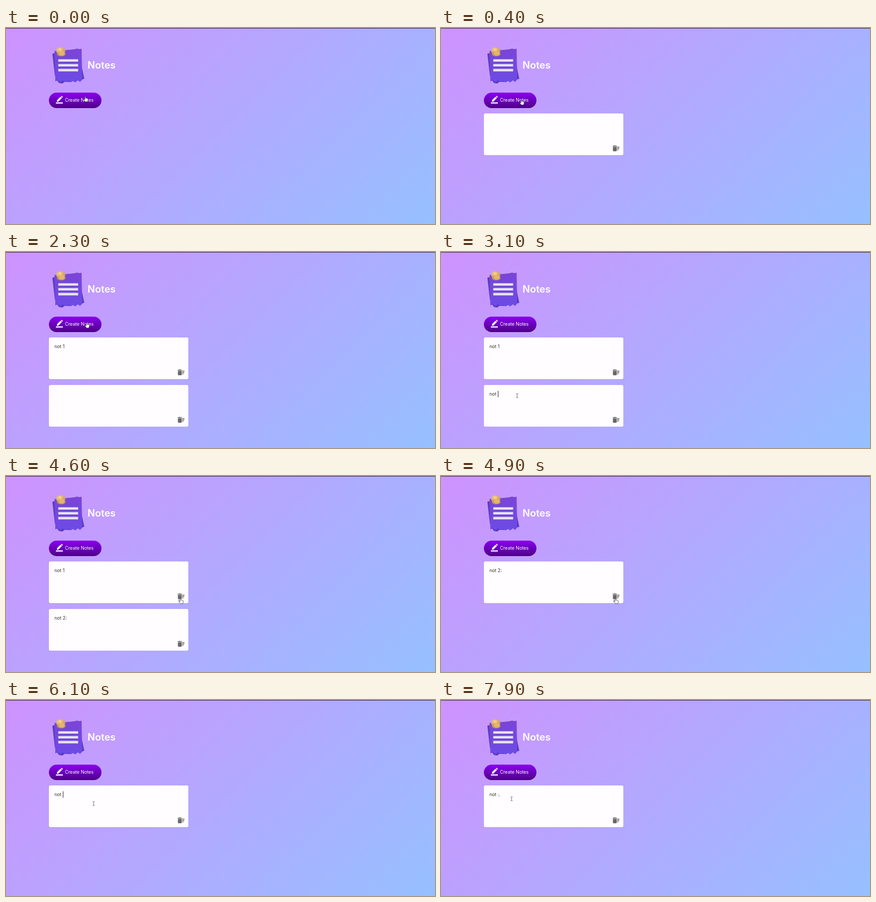
An HTML page that plays this animation: 800 px wide and 367 px high, repeating every 8000 ms.

```html
<!DOCTYPE html>
<html lang="en">
<head>
<meta charset="utf-8">
<title>Notes</title>
<style>
  html, body { margin: 0; width: 100%; height: 100%; overflow: hidden; }
  #stage {
    position: relative; width: 800px; height: 367px; overflow: hidden;
    background: linear-gradient(135deg, #ce92fe, #96c0ff);
    font-family: Inter, "Open Sans", sans-serif; font-size: 8.6px; line-height: 12px;
  }
  #stage > * { position: absolute; }
  #bar { left: 0; top: 0; width: 800px; height: 1.2px; background: #39363b; }
  h1 { left: 152px; top: 57px; margin: 0; color: #fff; font-size: 18.4px; font-weight: 600; line-height: 25px; }
  #create {
    left: 80px; top: 121px; width: 98px; height: 29px; border-radius: 15px;
    background: linear-gradient(#8a00f2, #4e0086); color: #fff;
  }
  #create span { position: absolute; left: 30px; top: 8px; white-space: pre; }
  .note { left: 80px; width: 260px; height: 78px; border-radius: 3px; background: #fffdff; color: #333; }
  .note span { position: absolute; left: 10.2px; top: 11px; white-space: pre; }
  .note i { position: absolute; left: 100%; top: 0; width: .7px; height: 11.5px; background: #333; }
  .note svg { position: absolute; left: 239px; top: 59px; }
  #art { left: 0; top: 0; }
</style>
</head>
<body>
<div id="stage">
  <div id="bar"></div>
  <h1>Notes</h1>
  <div id="create"><span>Create Notes</span></div>
  <div class="note" style="top:160px"></div>
  <div class="note" style="top:249px"></div>
  <svg id="art" width="800" height="367">
    <defs>
      <linearGradient id="paper" x2="0" y2="1"><stop stop-color="#7a45d6"/><stop offset="1" stop-color="#6c4be6"/></linearGradient>
      <radialGradient id="gold" cx=".4" cy=".3"><stop stop-color="#f6d79a"/><stop offset="1" stop-color="#d3a05a"/></radialGradient>
    </defs>
    <path fill="#5a3cc4" d="M86.500 48 134 38.500 146 95 140 97 135 96 120 101 109 101 105 104 99 103 95 98 91 88Z"/>
    <path fill="url(#paper)" d="M90.500 43 141 39 142 97 138 101 134 98 129 102 125 99 120 102 116 99 111 101 106 98 101 101 97 98 92 100Z"/>
    <path stroke="#e7e2f4" stroke-width="4.600" d="M97.500 60.700h37M97.500 69.800h37M97.500 78.900h37"/>
    <ellipse cx="103" cy="48.500" rx="8" ry="4.500" fill="#c9964f"/>
    <ellipse cx="102" cy="42.800" rx="8.800" ry="6.600" fill="url(#gold)"/>
    <ellipse cx="104" cy="47.500" rx="5.500" ry="4" fill="#e2b570"/>
    <path fill="#fff" d="M95 138v-2.700l6.600-6.600 2.600 2.600-6.700 6.700ZM102.300 128l.9-.8q.5-.4 1 0l1.500 1.600q.4.500 0 1l-.8.800ZM93 139.300h13v2.200H93Z"/>
    <g id="pointers" stroke-linejoin="round">
      <path id="hand" fill="#fff" stroke="#333" stroke-width=".7" d="M-.8 6V.8Q0-.4.8.8V3.500Q1.700 3 2.300 3.800 3.200 3.300 3.700 4.200 4.900 3.900 5 5V7Q4.500 8.500 4 10H-.3L-2.900 6.600Q-3-.0 -2.900 6.200-2.200 5-.8 6Z"/>
      <path id="arrow" fill="#fff" stroke="#333" stroke-width=".7" d="M0 0V7L1.700 5.500 2.800 8 4 7.400 2.900 5H5Z"/>
      <path id="beam" fill="none" stroke="#555" stroke-width=".8" d="M-2-3.600H-.6L0-3.100.6-3.600H2M0-3.100V3.100M-2 3.600H-.6L0 3.100.6 3.600H2"/>
    </g>
  </svg>
</div>
<script>
const LOOP = 8000, TICK = 100;

// Start time, then the text of each note; a trailing "|" marks the focused one.
const edits = [
  [0],
  [400, ""], [600, "|"], [800, "n|"], [900, "no|"], [1000, "not|"], [1100, "not |"], [1300, "not 1|"],
  [2200, "not 1"], [2300, "not 1", ""], [2800, "not 1", "|"],
  [2900, "not 1", "n|"], [3000, "not 1", "no|"], [3100, "not 1", "not |"],
  [3300, "not 1", "not 2|"], [3600, "not 1", "not 2:|"], [4400, "not 1", "not 2:"],
  [4800, "not 2:"], [5000],
  [5600, ""], [5800, "|"], [5900, "n|"], [6000, "no|"], [6100, "not |"],
  [6500, "not :|"], [7300, "not :.|"]
];

// Time, x, y and the pointer shape used from then on.
const moves = [
  [0, 148, 128, "hand"], [400, 150, 134, "hand"], [500, 156, 164, "beam"], [600, 162, 188, "beam"],
  [1600, 162, 188, "beam"], [1900, 156, 156, "arrow"], [2000, 151, 134, "hand"], [2500, 150, 131, "hand"],
  [2600, 149, 150, "arrow"], [2700, 145, 215, "beam"], [2800, 142, 269, "beam"],
  [3700, 142, 269, "beam"], [4000, 225, 243, "arrow"], [4200, 305, 230, "beam"], [4400, 325.5, 229, "hand"],
  [5000, 325.5, 229, "hand"], [5100, 285, 206, "arrow"], [5300, 169.5, 147, "arrow"],
  [5400, 151, 134, "hand"], [5600, 151, 134, "hand"], [5700, 158, 170, "beam"], [5800, 163.5, 194, "beam"],
  [6200, 163.5, 194, "beam"], [7000, 140, 185, "beam"], [7900, 131.7, 185, "beam"]
];

const noteBoxes = [...document.querySelectorAll(".note")];
const pointers = document.getElementById("pointers");
const trash = `<svg width="16" height="14" fill="#666">
  <path d="M1 1.400h2.500l.5-.7h2.200l.5.700h2.500v1.400H1ZM1.600 3.500h7V10.500q0 1.200-1.200 1.200H2.800Q1.600 11.700 1.600 10.500Z"/>
  <path d="M9.300 3.500h4.600v1.400H9.300ZM9.300 6.100h3.900v1.400H9.300ZM9.300 8.700h2.500v1.400H9.300Z"/></svg>`;

const indexAt = (steps, t) => steps.findLastIndex(step => step[0] <= t);

function noteContent(text, caretOn) {
  const caret = text.endsWith("|") && caretOn ? "<i></i>" : "";
  return `<span>${text.replace("|", "")}${caret}</span>${trash}`;
}

function drawNotes(t) {
  const [start, ...texts] = edits[indexAt(edits, t)];
  const caretOn = (t - start) % 1000 < 500;
  noteBoxes.forEach((box, i) => {
    const shown = i < texts.length;
    box.style.display = shown ? "" : "none";
    if (shown) box.innerHTML = noteContent(texts[i], caretOn);
  });
}

function drawPointer(t) {
  const i = indexAt(moves, t);
  const [t0, x0, y0, shape] = moves[i];
  const [t1, x1, y1] = moves[i + 1] || [LOOP, x0, y0];
  const k = (t - t0) / (t1 - t0);
  pointers.setAttribute("transform", `translate(${x0 + (x1 - x0) * k} ${y0 + (y1 - y0) * k})`);
  for (const pointer of pointers.children) pointer.style.display = pointer.id === shape ? "" : "none";
}

const startTime = performance.now();
let lastTick = -1;

function frame() {
  const elapsed = (performance.now() - startTime) % LOOP;
  const t = Math.floor(elapsed / TICK) * TICK;
  if (t !== lastTick) {
    drawNotes(t);
    drawPointer(t);
    lastTick = t;
  }
  requestAnimationFrame(frame);
}
frame();
</script>
</body>
</html>
```
